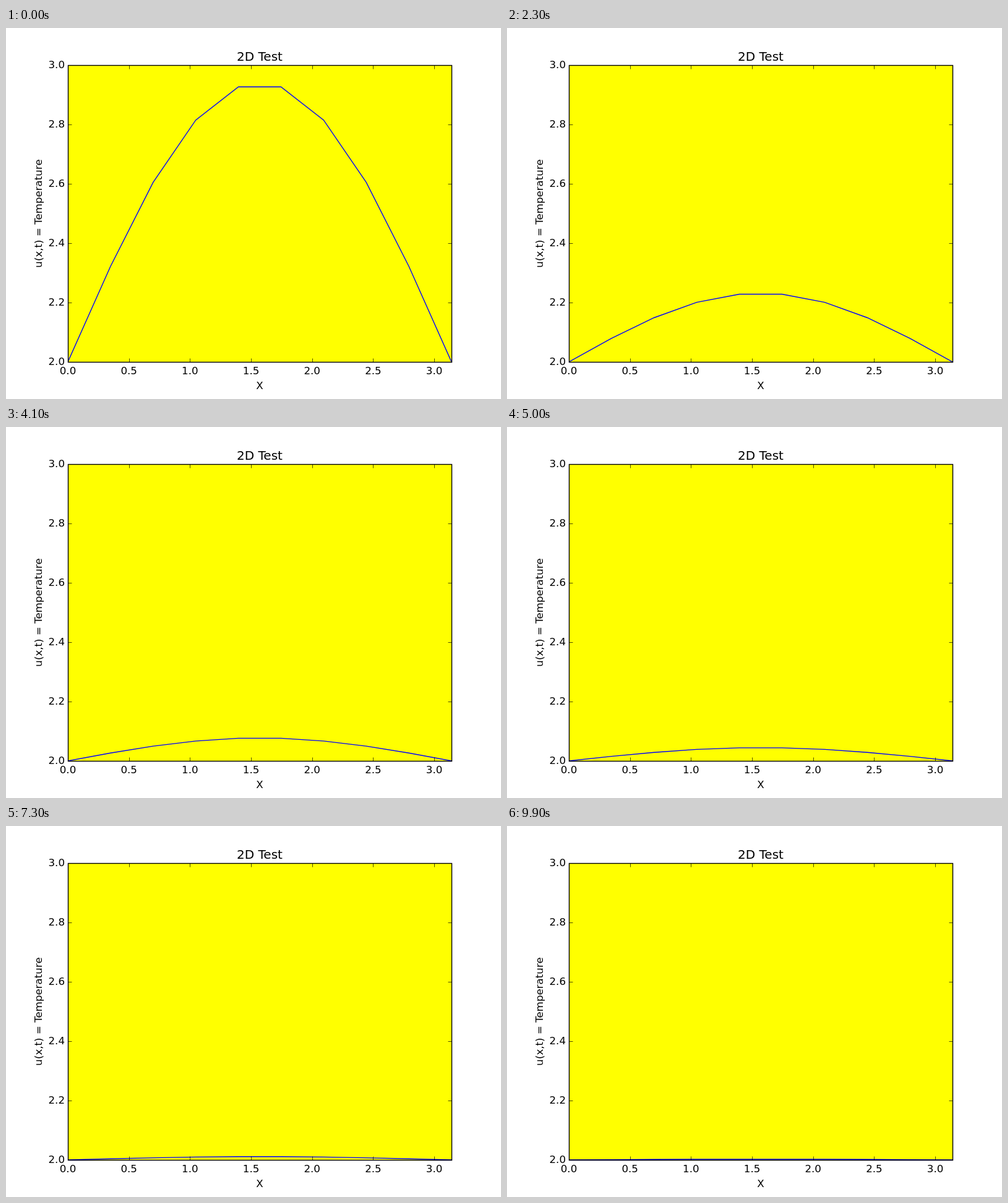
An HTML page with a canvas that plays this animation: 800 px wide and 600 px high, repeating every 10000 ms.

```html
<!DOCTYPE html>
<html lang="en">
<head>
<meta charset="utf-8">
<title>2D Test</title>
<style>
  html, body { margin: 0; width: 100%; height: 100%; overflow: hidden; background: #fff; }
  canvas { display: block; }
</style>
</head>
<body>
<canvas width="800" height="600"></canvas>
<script>
const ctx = document.querySelector('canvas').getContext('2d');
const LEFT = 100, RIGHT = 720, TOP = 60, BOTTOM = 540;
const POINTS = 10, STEP_MS = 100, STEPS = 100;
// Decay per step of the explicit heat equation with dt/dx² = 0.49
const DECAY = 1 - 2 * 0.49 * (1 - Math.cos(Math.PI / (POINTS - 1)));

const toX = x => LEFT + (RIGHT - LEFT) * x / Math.PI;
const toY = u => BOTTOM - (BOTTOM - TOP) * (u - 2);
const snap = v => Math.round(v) + 0.5;

function text(str, x, y, align = 'center', size = 50 / 3) {
  ctx.font = `${size}px "DejaVu Sans", sans-serif`;
  ctx.textAlign = align;
  ctx.fillText(str, x, y);
}

function line(x1, y1, x2, y2) {
  ctx.beginPath();
  ctx.moveTo(x1, y1);
  ctx.lineTo(x2, y2);
  ctx.stroke();
}

function drawCurve(step) {
  const amp = DECAY ** (step + 1);
  ctx.save();
  ctx.beginPath();
  ctx.rect(LEFT, TOP, RIGHT - LEFT, BOTTOM - TOP);
  ctx.clip();
  ctx.beginPath();
  for (let i = 0; i < POINTS; i++) {
    const x = Math.PI * i / (POINTS - 1);
    ctx.lineTo(toX(x), toY(2 + amp * Math.sin(x)));
  }
  ctx.strokeStyle = '#00f';
  ctx.lineWidth = 100 / 72;
  ctx.lineCap = 'square';
  ctx.stroke();
  ctx.restore();
}

function drawAxes() {
  ctx.strokeStyle = ctx.fillStyle = '#000';
  ctx.lineWidth = 100 / 72;
  ctx.strokeRect(LEFT + 0.5, TOP + 0.5, RIGHT - LEFT, BOTTOM - TOP);

  ctx.lineWidth = 50 / 72;
  for (let i = 0; i <= 6; i++) {
    const x = toX(i / 2), sx = snap(x);
    line(sx, BOTTOM + 0.5, sx, BOTTOM - 5.5);
    line(sx, TOP + 0.5, sx, TOP + 6.5);
    text((i / 2).toFixed(1), x, 560);
  }
  for (let i = 0; i <= 5; i++) {
    const u = 2 + i / 5, y = Math.round(toY(u)), sy = y + 0.5;
    line(LEFT + 0.5, sy, LEFT + 6.5, sy);
    line(RIGHT + 0.5, sy, RIGHT - 5.5, sy);
    text(u.toFixed(1), 95, y + 5, 'right');
  }

  text('2D Test', 410, 53, 'center', 20);
  text('X', 410, 584);
  ctx.save();
  ctx.translate(58, 300);
  ctx.rotate(-Math.PI / 2);
  text('u(x,t) = Temperature', 0, 0);
  ctx.restore();
}

function draw() {
  const step = Math.floor(performance.now() / STEP_MS) % STEPS;
  ctx.fillStyle = '#fff';
  ctx.fillRect(0, 0, 800, 600);
  ctx.fillStyle = '#ff0';
  ctx.fillRect(LEFT, TOP, RIGHT - LEFT, BOTTOM - TOP);
  drawCurve(step);
  drawAxes();
  requestAnimationFrame(draw);
}
draw();
</script>
</body>
</html>
```
